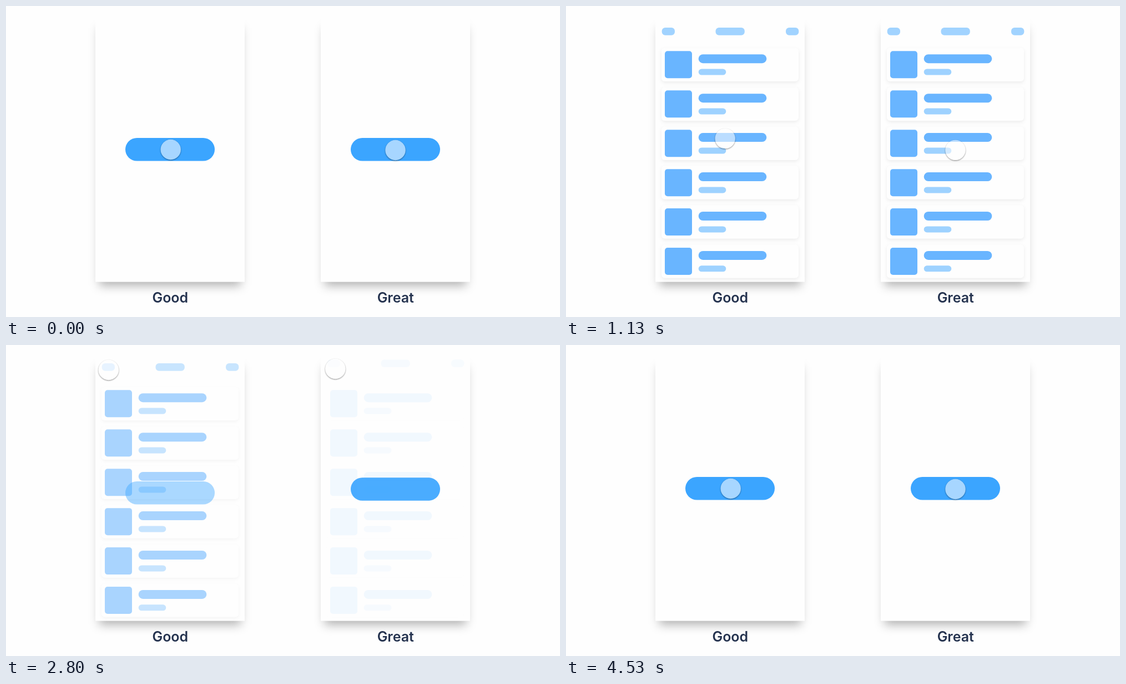
Write an HTML page that moves like this. It is 998x561 px and loops after 4660 ms.

```html
<!DOCTYPE html>
<html lang="en">
<head>
<meta charset="utf-8">
<title>Good and great transitions</title>
<style>
  html, body { margin: 0; width: 100%; height: 100%; overflow: hidden; background: #fefefe; }
  svg { display: block; width: 998px; height: 561px; }
  text { font: 600 25px Inter, sans-serif; fill: #25334f; text-anchor: middle; }
</style>
</head>
<body>
<svg id="stage" viewBox="0 0 998 561" xmlns="http://www.w3.org/2000/svg">
  <defs>
    <filter id="panelBlur" filterUnits="userSpaceOnUse" x="120" y="0" width="350" height="561" color-interpolation-filters="sRGB">
      <feGaussianBlur stdDeviation="9"/>
    </filter>
    <filter id="cardBlur" filterUnits="userSpaceOnUse" x="155" y="60" width="280" height="95" color-interpolation-filters="sRGB">
      <feGaussianBlur stdDeviation="3"/>
    </filter>
    <!-- shadow outside the disc only -->
    <filter id="rim" filterUnits="userSpaceOnUse" x="-26" y="-26" width="52" height="52" color-interpolation-filters="sRGB">
      <feGaussianBlur in="SourceAlpha" stdDeviation="0.8"/>
      <feOffset dy="1" result="soft"/>
      <feComposite in="soft" in2="SourceAlpha" operator="out"/>
    </filter>
  </defs>
</svg>
<script>
const LOOP = 4660, SLIDE = 14, GAP = 406, ROWS = 6;
const stage = document.getElementById('stage');

function add(parent, tag, attrs = {}) {
  const el = document.createElementNS('http://www.w3.org/2000/svg', tag);
  for (const k in attrs) el.setAttribute(k, attrs[k]);
  return parent.appendChild(el);
}
const box = (parent, x, y, width, height, rx, fill, more) =>
  add(parent, 'rect', { x, y, width, height, rx, fill, ...more });

function buildCard(parent, y) {
  const outer = add(parent, 'g', { transform: `translate(0 ${y})` });
  const g = add(outer, 'g');
  box(g, 172, 78, 247, 60.5, 6, '#000', { 'fill-opacity': 0.07, filter: 'url(#cardBlur)' });
  box(g, 172, 75.5, 247, 60.5, 6, '#fefefe');
  box(g, 178, 81.3, 49, 49, 5, '#69b5ff');
  box(g, 238.7, 87.2, 122.6, 16, 8, '#69b5ff');
  box(g, 238.7, 113.6, 49.6, 11, 5.5, '#9ed2ff');
  return g;
}

function buildPhone(x, label) {
  const root = add(stage, 'g', { transform: `translate(${x} 0)` });
  box(root, 168, 40, 255, 464.5, 0, '#000', { 'fill-opacity': 0.3, filter: 'url(#panelBlur)' });
  box(root, 161, 19, 269, 478.7, 0, '#fefefe');
  const cards = Array.from({ length: ROWS }, (_, i) => buildCard(root, i * 70.95));
  const header = add(root, 'g');
  for (const [px, w] of [[172.7, 23.3], [269.5, 52.3], [396, 23.3]])
    box(header, px, 39, w, 13.8, 6, '#a1d3ff');
  const button = box(root, 215, 238, 161, 41.6, 20.8, '#3ba5ff');
  const cursor = add(root, 'g');
  add(cursor, 'circle', { r: 18.2, filter: 'url(#rim)', opacity: 0.45 });
  add(cursor, 'circle', { r: 18.2, fill: '#fff', 'fill-opacity': 0.55 });
  add(root, 'text', { x: 295.8, y: 535 }).textContent = label;
  return { cards, header, button, cursor };
}

const span = (t, from, length) => Math.min(1, Math.max(0, (t - from) / length));
const sine = u => (1 - Math.cos(Math.PI * u)) / 2;
const outCubic = u => 1 - (1 - u) ** 3;
const mix = (a, b, p) => a + (b - a) * p;

function place(el, x, y, opacity = 1) {
  el.setAttribute('transform', `translate(${x.toFixed(2)} ${y.toFixed(2)})`);
  el.setAttribute('opacity', opacity.toFixed(3));
}

const good = {
  ...buildPhone(0, 'Good'),
  open: t => sine(span(t, 80, 400)),
  close: t => sine(span(t, 2630, 375)),
  card: t => good.open(t),
  cardSlide: 0,
  home: [296.7, 259], peak: [186, 39.3], rest: [184.8, 45],
  away: [950, 930], back: [3210, 590]
};
const great = {
  ...buildPhone(GAP, 'Great'),
  open: t => sine(span(t, 60, 320)),
  close: t => outCubic(span(t, 2460, 600)),
  card: (t, i) => sine(span(t, 66 + 131 * i, 275)),
  cardSlide: SLIDE,
  home: [295.5, 260], peak: [187.3, 36.5], rest: [187.3, 43],
  away: [1120, 800], back: [3310, 620]
};

// out in a straight line, a small settle, then back along an arc
function cursorAt(p, t) {
  const go = sine(span(t, ...p.away));
  const settle = sine(span(t, 1940, 200));
  const s = sine(span(t, ...p.back));
  const arc = bend => 2 * s * (1 - s) * bend + s * s;
  return [0.7, 0.3].map((bend, k) => {
    const there = mix(mix(p.home[k], p.peak[k], go), p.rest[k], settle);
    return mix(there, p.home[k], arc(bend));
  });
}

function drawPhone(p, t) {
  const stay = 1 - p.close(t);
  const shown = p.open(t) * stay;
  p.cards.forEach((card, i) => {
    const a = p.card(t, i);
    place(card, 0, p.cardSlide * (1 - a), a * stay);
  });
  place(p.header, 0, -SLIDE * (1 - shown), shown);
  place(p.button, 0, SLIDE * shown, 1 - shown);
  place(p.cursor, ...cursorAt(p, t));
}

function draw(now) {
  const t = now % LOOP;
  drawPhone(good, t);
  drawPhone(great, t);
}

const start = performance.now();
function tick() {
  draw(performance.now() - start);
  requestAnimationFrame(tick);
}
tick();
</script>
</body>
</html>
```
